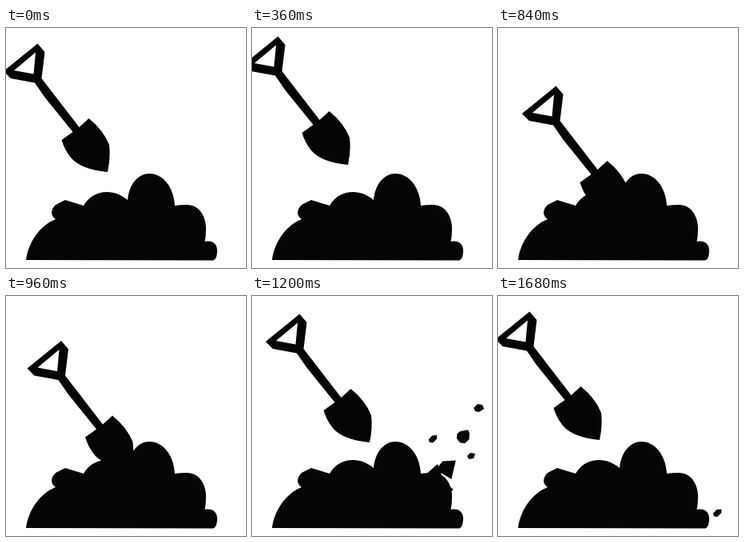
An HTML page that plays this animation: 300x300 px, repeating every 1800 ms.

```html
<!DOCTYPE html>
<html lang="en">
<head>
<meta charset="utf-8">
<title>Digging shovel</title>
<style>
  html, body { margin: 0; width: 100%; height: 100%; overflow: hidden; background: #fff; }
  svg { display: block; width: 100vw; height: 100vh; fill: #050505; }
</style>
</head>
<body>
<svg viewBox="0 0 300 300">
  <path d="M25 290C28 268 42 247 62 239C55 234 56 227 62 221L74 215L97 222C104 210 115 205 126 205
    C136 205 145 209 152 215C154 194 166 182 179 182C197 182 210 200 211 222Q218 221 226 221
    C242 221 250 236 250 251Q250 260 248.5 267C258 265 264 270 264 278C264 285 262 290 259 290.5Z"/>
  <path id="shovel" fill-rule="evenodd" d="M39.5 19.5L48.5 30L44.5 63L91.5 124L103.5 113Q122 128 129 146Q131 162 127 180
    Q94 177 81 162Q73 152 69.5 140L83.5 130L48 86L36 68.5L6 63L-3 54Z M37 30.5L10 53L34.5 57.5Z"/>
  <g id="debris"></g>
</svg>
<script>
const STEP = 120, STEPS = 15, BURST = 9;

// Shovel key poses: step, dx, dy
const poses = [[0, 0, 0], [2, -11, -16], [3, -7, -9], [5, 7, 24], [7, 33, 53],
               [9, 26, 20], [10, 20, 3], [11, 14, -2], [12, 8, -2], [14, 0, 0], [15, 0, 0]];

// Each clod: outline at the burst, velocity and acceleration per step
const clods = [
  { d: 'M234 128L239 123L245 124L247 129L241 133L236 132Z', v: [43, 10], a: [0, 2] },
  { d: 'M202.5 165L207 160L213 159.5L213 164L208 169L204 168.5Z', v: [19.4, 12.9], a: [-1.23, 1.7] },
  { d: 'M242.5 174L246 171L256 169L258 173L257.5 181L252 186L246 185L242 180Z', v: [13.9, -3.7], a: [0, 2] },
  { d: 'M239 190L243 186L249 187L247 193L241 194Z', v: [30, 8], a: [0, 2] },
  { d: 'M216 202L222.5 194L239 193L233.5 216.5L216 206Z', v: [15.8, 9.7], a: [0, 2.9] },
  { d: 'M205 207L222 192L228 209L222 209L213 212Z', v: [10, 16], a: [0, 2] },
  { d: 'M208 231L213 224L226 217L235 224L227 233L212 235Z', v: [16.7, 16.7], a: [0, 1] }
];

const shovel = document.getElementById('shovel');
const debris = document.getElementById('debris');
for (const clod of clods) {
  clod.node = document.createElementNS('http://www.w3.org/2000/svg', 'path');
  clod.node.setAttribute('d', clod.d);
  debris.append(clod.node);
}

const move = (node, x, y) => node.setAttribute('transform', `translate(${x} ${y})`);

function poseAt(step) {
  const i = poses.findIndex(p => p[0] > step);
  const [s0, x0, y0] = poses[i - 1], [s1, x1, y1] = poses[i];
  const k = (step - s0) / (s1 - s0);
  return [x0 + (x1 - x0) * k, y0 + (y1 - y0) * k];
}

function draw(now) {
  const step = Math.floor(now / STEP) % STEPS;
  move(shovel, ...poseAt(step));
  const n = step - BURST;
  debris.style.display = n < 0 ? 'none' : '';
  for (const { node, v, a } of clods)
    move(node, v[0] * n + a[0] * n * n, v[1] * n + a[1] * n * n);
}

const start = performance.now();
function tick() {
  draw(performance.now() - start);
  requestAnimationFrame(tick);
}
tick();
</script>
</body>
</html>
```
